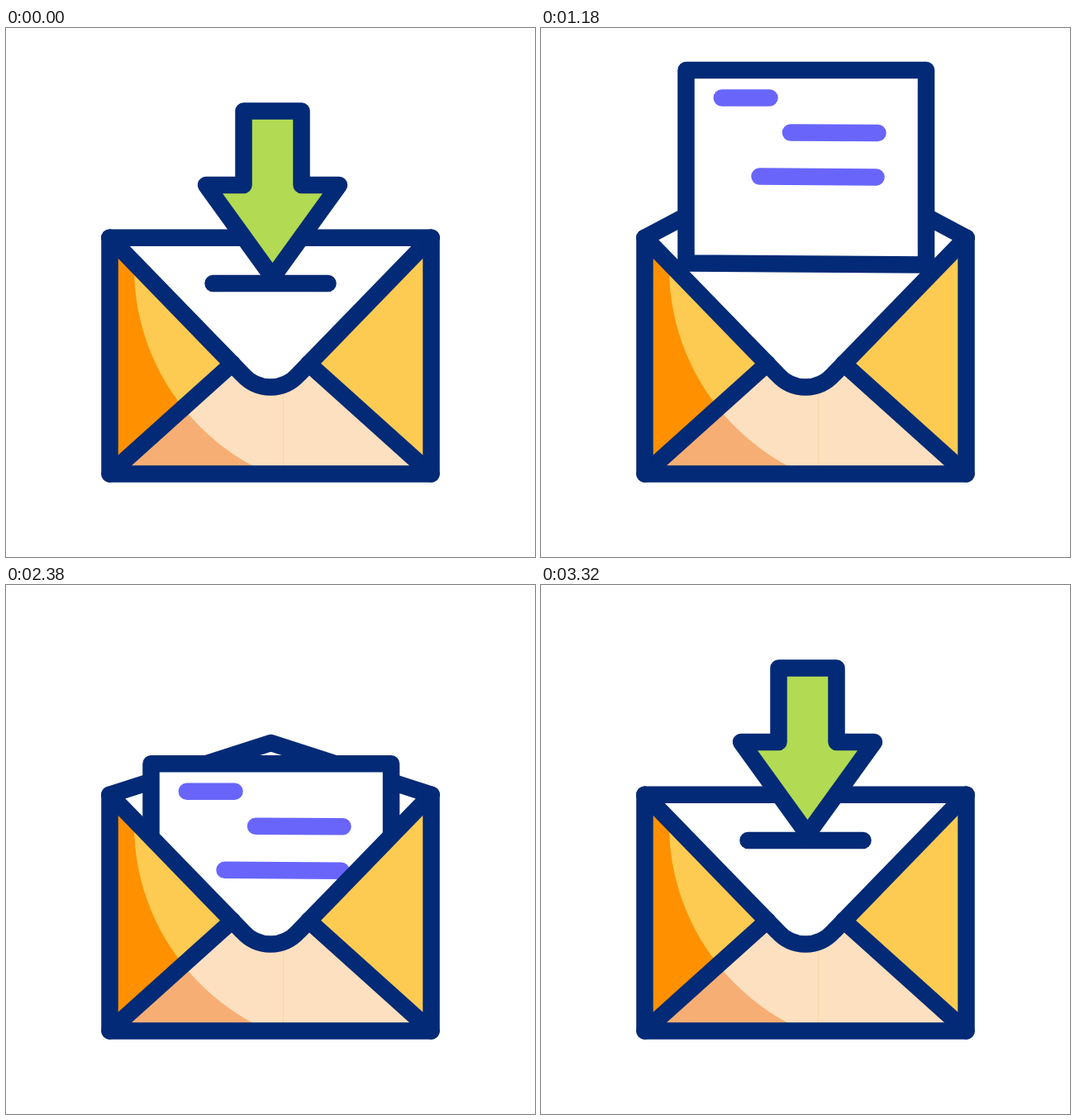
Recreate the animation shown at these times as an HTML page with a canvas. Size 640 px wide and 640 px high, loop 3.54 s.

```html
<!DOCTYPE html>
<html lang="en">
<head>
<meta charset="utf-8">
<title>Envelope</title>
<style>
html, body { margin: 0; width: 100%; height: 100%; overflow: hidden; background: #fff; }
canvas { display: block; width: 100vmin; height: 100vmin; }
</style>
</head>
<body>
<canvas id="stage" width="640" height="640"></canvas>
<script>
const ctx = document.getElementById('stage').getContext('2d');
const LOOP = 3540, STEP = 20, LINE = 20.5;
const NAVY = '#032a76', GREEN = '#b2da52', PURPLE = '#6965fb', TEAL = '#67ccd1';
const YELLOW = '#fecb52', ORANGE = '#ff9100', PEACH = '#fde0bf', SHADE = '#f7ae74';

// Envelope frame
const L = 125.5, R = 514.5, T = 253.7, B = 539.5, MID = 320;
const CLOSED = T, OPEN = 150.5, REST = 189;

const clamp = v => Math.min(1, Math.max(0, v));
const ramp = (t, a, b) => clamp((t - a) / (b - a));
const sine = u => (1 - Math.cos(Math.PI * u)) / 2;
const mix = (a, b, u) => a + (b - a) * u;

function poly(points, closed) {
  const p = new Path2D();
  points.forEach(([x, y], i) => i ? p.lineTo(x, y) : p.moveTo(x, y));
  if (closed) p.closePath();
  return p;
}

function fill(path, color) {
  ctx.fillStyle = color;
  ctx.fill(path);
}

function stroke(path, color = NAVY, width = LINE) {
  ctx.strokeStyle = color;
  ctx.lineWidth = width;
  ctx.stroke(path);
}

function addPocket(p) {
  p.lineTo(286, 419);
  p.bezierCurveTo(304.5, 439.7, 335.5, 439.7, 354, 419);
  p.lineTo(R, T);
}

const pocket = new Path2D();
pocket.moveTo(L, T);
addPocket(pocket);

// Everything above the pocket edge, where the letter can be seen
const opening = new Path2D();
opening.moveTo(0, -500);
opening.lineTo(0, T);
opening.lineTo(L, T);
addPocket(opening);
opening.lineTo(640, T);
opening.lineTo(640, -500);
opening.closePath();

const front = new Path2D();
front.moveTo(L, T);
addPocket(front);
front.lineTo(R, B);
front.lineTo(L, B);
front.closePath();

const bottom = poly([[L, B], [274, 406], [MID, 440], [366, 406], [R, B]], true);
const folds = [poly([[L, B], [274, 406]]), poly([[R, B], [366, 406]])];
const walls = poly([[L, T], [L, B], [R, B], [R, T]]);

const shadow = new Path2D();
shadow.rect(L, T, 210, B - T);
shadow.arc(427, 290, 272, 0, Math.PI * 2);

const arrow = poly([
  [287.5, 100.5], [357.5, 100.5], [357.5, 190], [403, 190],
  [322.5, 301.5], [242, 190], [287.5, 190]
], true);

// Text bars on the letter: x1, x2, y, tilt, highlight on, highlight off
const bars = [
  [218.8, 276.5, 44, 0, 1460, 2160],
  [302, 407.5, 86, 0.5, 1582, 2040],
  [264.5, 405.5, 139, 1, 1704, 1920]
];

function drawFlap(t) {
  const lift = sine(ramp(t, 740, 920)) - sine(ramp(t, 2284, 2507));
  const path = poly([[L, T], [320.5, mix(CLOSED, OPEN, lift)], [R, T]]);
  fill(path, '#fff');
  stroke(path);
}

function letterTop(t) {
  if (t < 2284) return mix(-260, REST, sine(ramp(t, 753, 1453)));
  return REST + 231 * ((t - 2284) / 356) ** 2;
}

function drawLetter(t) {
  const y = letterTop(t);
  if (y > 450) return;
  ctx.save();
  ctx.clip(opening);
  ctx.translate(0, y);
  const sheet = poly([[175.5, 10.5], [466, 10.5], [466, 246], [175.5, 244]], true);
  fill(sheet, '#fff');
  stroke(sheet);
  for (const [x1, x2, by, tilt, on, off] of bars) {
    stroke(poly([[x1, by], [x2, by + tilt]]), PURPLE);
    const u = ramp(t, on, on + 120) - ramp(t, off, off + 120);
    if (u > 0) stroke(poly([[x1, by], [mix(x1, x2, u), by + tilt * u]]), TEAL, 23);
  }
  ctx.restore();
}

function drawFront() {
  fill(front, YELLOW);
  ctx.save();
  ctx.clip(front);
  ctx.save();
  ctx.clip(shadow, 'evenodd');
  ctx.fillStyle = ORANGE;
  ctx.fillRect(L, T, 210, B - T);
  ctx.restore();
  ctx.clip(bottom);
  fill(bottom, PEACH);
  ctx.clip(shadow, 'evenodd');
  ctx.fillStyle = SHADE;
  ctx.fillRect(L, T, 210, B - T);
  ctx.restore();
  folds.forEach(f => stroke(f));
  stroke(pocket);
  stroke(walls);
}

function drawDash(t) {
  const u = t < 1500 ? 1 - ramp(t, 660, 737) : ramp(t, 2607, 2684);
  if (u > 0) stroke(poly([[250.5, 309], [mix(250.5, 389.5, u), 309]]));
}

function drawArrow(t) {
  const n = t < 1500 ? Math.max(0, t - 660) : Math.max(0, 2703 - t);
  const rise = 6.5 * (n / STEP) ** 2;
  if (rise > 330) return;
  ctx.save();
  ctx.translate(0, -rise);
  fill(arrow, GREEN);
  stroke(arrow);
  ctx.restore();
}

function draw(now) {
  const t = Math.floor((now % LOOP) / STEP) * STEP;
  ctx.fillStyle = '#fff';
  ctx.fillRect(0, 0, 640, 640);
  ctx.lineCap = ctx.lineJoin = 'round';
  drawFlap(t);
  drawLetter(t);
  drawFront();
  drawDash(t);
  drawArrow(t);
}

const start = performance.now();
function tick() {
  draw(performance.now() - start);
  requestAnimationFrame(tick);
}
tick();
</script>
</body>
</html>
```
